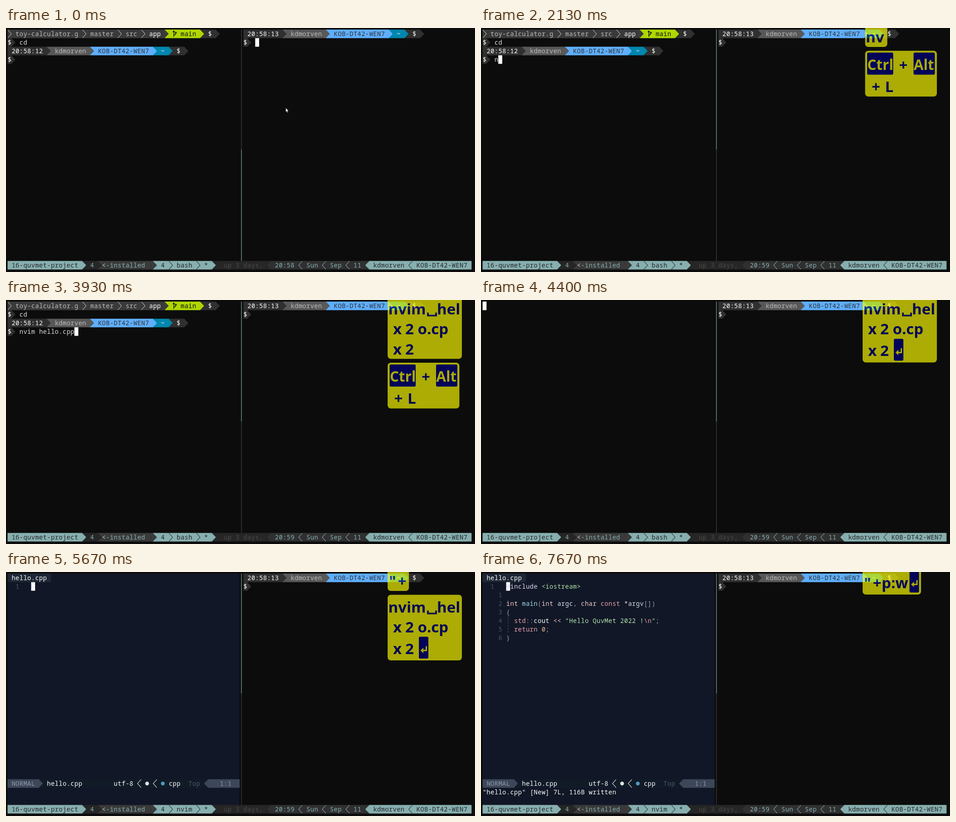
An HTML page that plays this animation: 1036x541 px, repeating every 8000 ms.

```html
<!DOCTYPE html>
<html lang="en">
<head>
<meta charset="utf-8">
<title>Terminal session</title>
<style>
html, body { margin: 0; width: 100%; height: 100%; overflow: hidden; background: #0c0c0c; }
svg { display: block; width: 1036px; height: 541px; }
.term { font: 13.8px "Noto Sans Mono", "DejaVu Sans Mono", monospace; letter-spacing: .4px; font-variant-ligatures: none; }
.keys { font: bold 33px "Open Sans", "Noto Sans", sans-serif; opacity: .66; }
.cap { font-size: 31.5px; }
</style>
</head>
<body>
<svg id="stage" viewBox="0 0 1036 541"></svg>
<script>
const LOOP = 8000, W = 8.682, H = 19;
const USER = 'kdmorven', HOST = 'KOB-DT42-WEN7', PROJECT = '16-quvmet-project';
const TEAL = '#87afaf', DARK = '#303030', GREY = '#585858', SKY = '#5fafff', BLUE = '#0087af',
  LIME = '#afd700', INK = '#262626', WHITE = '#fff', SOFT = '#bcbcbc', SHADE = '#3a3a3a',
  EDIT = '#111726', TAB = '#1e2735', MODE = '#3c4759', DIM = '#4b5565';
const YELLOW = '#ff0', NAVY = '#000080';
const LAP = .4; // overlap that hides seams between neighbouring cells

const X = c => 3.5 + c * W;
const Y = r => 3.5 + r * H;
const esc = s => s.replace(/&/g, '&amp;').replace(/</g, '&lt;');
const upTo = (times, t) => times.filter(at => at <= t).length;

const rect = (x, y, w, h, fill, rx = 0) =>
  `<rect x="${x}" y="${y}" width="${w}" height="${h}" fill="${fill}" rx="${rx}"/>`;
const line = (d, color, w) => `<path d="${d}" fill="none" stroke="${color}" stroke-width="${w}"/>`;
const cells = (c, r, n, fill) => rect(X(c), Y(r), n * W, H, fill);
const cursor = (c, r) => cells(c, r, 1, WHITE);

// Symbols drawn inside one cell
const glyphs = {
  '›': (x, y, f) => line(`M${x + .5} ${y + .5}l8 9l-8 9`, f, 1.1),
  '‹': (x, y, f) => line(`M${x + 8.5} ${y + .5}l-8 9l8 9`, f, 1.1),
  'ψ': (x, y, f) => line(`M${x + 2.5} ${y + 3}v13M${x + 2.5} ${y + 12.5}q4.5 -1 4.5 -5M${x + .5} ${y + 5.5}l2 -2.5l2 2.5M${x + 5} ${y + 8}l2 -2.5l2 2.5`, f, 1.4),
  '●': (x, y, f) => `<circle cx="${x + 4.3}" cy="${y + 9.5}" r="4.2" fill="${f}"/>`
};

function text(c, r, str, fill) {
  let out = '';
  for (const m of str.matchAll(/[›‹ψ●]|[^\s›‹ψ●]+/g)) {
    const x = X(c + m.index), draw = glyphs[m[0]];
    out += draw ? draw(x, Y(r), fill)
      : `<text x="${x + .2}" y="${Y(r) + 14.3}" fill="${fill}">${esc(m[0])}</text>`;
  }
  return out;
}
const seg = (c, r, str, bg, fg) =>
  rect(X(c), Y(r), str.length * W + LAP, H, bg) + text(c, r, str, fg);

function tip(c, r, fill, under, left) {
  const x = left ? X(c + 1) + LAP : X(c) - LAP, dx = left ? -W - LAP : W + LAP;
  return (under ? rect(X(c), Y(r), W + LAP, H, under) : '') +
    `<path d="M${x} ${Y(r)}l${dx} ${H / 2}l${-dx} ${H / 2}z" fill="${fill}"/>`;
}

const dollar = (c, r) => seg(c, r, '$', DARK, WHITE) + tip(c + 1, r, DARK);

function prompt(c, r, time) {
  return seg(c, r, ` ${time} `, DARK, WHITE) + tip(c + 10, r, DARK, GREY) +
    seg(c + 11, r, ` ${USER} `, GREY, SOFT) + tip(c + 21, r, GREY, SKY) +
    seg(c + 22, r, ` ${HOST} `, SKY, DARK) + tip(c + 37, r, SKY, BLUE) +
    seg(c + 38, r, ' ~ ', BLUE, WHITE) + tip(c + 41, r, BLUE, DARK) +
    seg(c + 42, r, ' $ ', DARK, WHITE) + tip(c + 45, r, DARK) + dollar(c, r + 1);
}

const COMMAND = 'nvim hello.cpp';
const typedAt = [1930, 2200, 2270, 2330, 2470, 2730, 2800, 2930, 3070, 3270, 3530, 3730, 3800, 3930];

function shell(t) {
  if (t >= 4330) return cursor(0, 0);
  const n = upTo(typedAt, t);
  let out = seg(0, 0, '› toy-calculator.g › master › src › ', SHADE, SOFT) +
    seg(36, 0, 'app ', SHADE, WHITE) + tip(40, 0, SHADE, LIME) +
    seg(41, 0, ' ψ main ', LIME, '#0c0c0c') + tip(49, 0, LIME, DARK) +
    seg(50, 0, ' $ ', DARK, WHITE) + tip(53, 0, DARK) +
    dollar(0, 1) + text(3, 1, 'cd', '#ddd') + prompt(0, 2, '20:58:12') +
    text(3, 3, COMMAND.slice(0, n), '#ddd');
  if (t >= 4270) out += cursor(0, 4);
  else if (t >= 1400) out += cursor(3 + n, 3);
  return out;
}

const ROSE = '#f2cdcd', RED = '#e8a2af', GREEN = '#b1e3ad', CYAN = '#a4dcea', PALE = '#d9e0ee', MUTE = '#989baa';
const code = [
  [1, 6, [['#include ', '#ddd6f3'], ['<iostream>', GREEN]]],
  [3, 6, [['int ', ROSE], ['main', CYAN], ['(', MUTE], ['int ', ROSE], ['argc', PALE], [', ', MUTE],
    ['char ', ROSE], ['const ', RED], ['*', ROSE], ['argv', PALE], ['[])', MUTE]]],
  [4, 6, [['{', MUTE]]],
  [5, 8, [['std', RED], ['::', MUTE], ['cout ', WHITE], ['<< ', ROSE], ['"Hello QuvMet 2022 !', GREEN],
    ['\\n', RED], ['"', GREEN], [';', MUTE]]],
  [6, 8, [['return ', RED], ['0', '#f8bd96'], [';', MUTE]]],
  [7, 6, [['}', MUTE]]]
];

function buffer() {
  let out = '';
  for (const [row, start, parts] of code) {
    let c = start;
    for (const [str, fill] of parts) {
      out += text(c, row, str, fill);
      c += str.length;
    }
  }
  for (let r = 2; r < 8; r++) out += text(4, r, String(r - 1), DIM);
  return out + `<path d="M${X(6.5)} ${Y(5)}v38" stroke="${DIM}" stroke-dasharray="4 2.3"/>`;
}

function editor(t) {
  const pasted = t >= 6270, dirty = pasted && t < 7670;
  let out = rect(3.5, 3.5, 59 * W, 27 * H, EDIT) +
    seg(0, 0, dirty ? ' + hello.cpp ' : ' hello.cpp ', TAB, WHITE) + text(2, 1, '1', DIM);
  if (t < 6070 || (pasted && t < 7070) || t >= 7600) out += cursor(6, 1);
  if (pasted) out += buffer();
  out += cells(0, 24, 59, '#111b28') + seg(0, 24, ' NORMAL ', MODE, '#8f9bab') + tip(8, 24, MODE) +
    text(10, 24, dirty ? 'hello.cpp [+]' : 'hello.cpp', WHITE) +
    text(27, 24, 'utf-8 ‹   ‹', WHITE) + text(35, 24, '●', '#e0e0e0') + text(39, 24, '●', '#519aba') +
    text(41, 24, 'cpp', WHITE) + text(46, 24, 'Top', DIM) +
    tip(50, 24, MODE, '', true) + seg(51, 24, '   1:1  ', MODE, '#8f9bab');
  if (t < 5470) {
    out += text(20, 25, 'Telescope-Frecency: removed 1 missing e', WHITE) + text(0, 26, 'ntries.', WHITE);
  } else if (t >= 7600) {
    out += text(0, 25, '"hello.cpp" [New] 7L, 116B written', WHITE);
  } else if (t >= 7070) {
    const cmd = t < 7400 ? ':' : ':w';
    out += text(0, 25, cmd, WHITE) + cursor(cmd.length, 25);
  }
  return out;
}

function statusBar(t) {
  const r = 27, app = t < 4600 ? 'bash' : 'nvim', clock = t < 1400 ? '20:58' : '20:59';
  return seg(0, r, ` ${PROJECT} `, TEAL, INK) + tip(19, r, TEAL, INK) +
    seg(20, r, ' 4 ', INK, TEAL) + tip(23, r, INK, SHADE) +
    seg(24, r, '<', SHADE, '#d0d0d0') + seg(25, r, '-installed  ', SHADE, TEAL) + tip(37, r, SHADE, TEAL) +
    seg(38, r, ` 4 › ${app} › * `, TEAL, INK) + tip(52, r, TEAL, INK) +
    seg(53, r, '  up 3 days, ', INK, '#4a4a4a') + tip(66, r, DARK, INK, true) +
    seg(67, r, ` ${clock} ‹ Sun ‹ Sep ‹ 11 `, DARK, TEAL) + tip(91, r, TEAL, DARK, true) +
    seg(92, r, ` ${USER} ‹ ${HOST} `, TEAL, INK);
}

function divider(t) {
  const x = X(59.5), top = t >= 1400;
  return line(`M${x} 3.5V269.5`, top ? TEAL : '#444', 1.2) +
    line(`M${x} 269.5V516.5`, top ? '#444' : TEAL, 1.2);
}

// Key display
const word = (x, y, str, fill = NAVY, cls = '') =>
  `<text x="${x}" y="${y}" fill="${fill}" class="${cls}">${esc(str)}</text>`;
const panel = (x, y, w, h) => rect(x, y, w, h, YELLOW, 7);
const keycap = (x, y, w, label) => rect(x, y, w, 49, NAVY, 3) + word(x + .2, y + 38, label, YELLOW, 'cap');
const enter = (x, y) => rect(x, y, 21, 48.5, NAVY, 3) +
  line(`M${x + 16.5} ${y + 21}v9.5h-9`, YELLOW, 3) +
  `<path d="M${x + 3.5} ${y + 30.5}l6.5 -6v12z" fill="${YELLOW}"/>`;

const combo = (x, y) => panel(x, y, 158.5, 101.5) + keycap(x + 4.5, y + 4, 57.5, 'Ctrl') +
  word(x + 75, y + 43, '+') + keycap(x + 107, y + 4, 47, 'Alt') +
  word(x + 14.5, y + 91, '+') + word(x + 44, y + 91, 'L');

const openAt = [1870, 2130, 2200, 2270, 2400, 2670, 2800, 2930, 3070, 3270, 3530, 3670, 3800, 3930, 4200];
const openW = [30, 49, 59, 91, 115, 135, 154, 164];
const openH = n => n < 9 ? 49 : n < 14 ? 93.5 : n < 15 ? 137.5 : 145.5;

function openKeys(x, y, n) {
  const twice = base => word(x + 12, base, 'x') + word(x + 39, base, '2');
  let out = panel(x, y, openW[Math.min(n, 8) - 1], openH(n)) + word(x + 1.5, y + 39, 'nvim'.slice(0, n));
  if (n > 4) out += line(`M${x + 89} ${y + 35}v6.5h18v-6.5`, NAVY, 3.6);
  if (n > 5) out += word(x + 109, y + 39, 'hel'.slice(0, n - 5));
  if (n > 8) out += twice(y + 83) + word(x + 66.5, y + 83, 'o.cp'.slice(0, n - 9));
  if (n > 13) out += twice(y + (n > 14 ? 131 : 127.5));
  if (n > 14) out += enter(x + 69, y + 93);
  return out;
}

const saveAt = [5330, 5670, 6070, 7070, 7330, 7530];
const saveW = [24, 47, 68, 77, 104, 129];

function saveKeys(x, y, n) {
  const base = y + (n > 5 ? 42.5 : 39);
  return panel(x, y, saveW[n - 1], n > 5 ? 57 : 49) + word(x + 3, base, '"') +
    (n > 1 ? word(x + 22.5, base, '+') : '') + word(x + 42, base, 'p:w'.slice(0, Math.max(0, n - 2))) +
    (n > 5 ? enter(x + 103.5, y + 4) : '');
}

function keys(t) {
  if (t < 1330) return '';
  const opened = upTo(openAt, t), saved = upTo(saveAt, t);
  const x = opened < 8 ? 848.5 : 843;
  let y = -7, out = '';
  if (saved) {
    out += saveKeys(x, y, saved);
    y += 57.5;
  }
  if (opened && t < 7270) {
    out += openKeys(x, y, opened);
    y += openH(opened) + 8.5;
  }
  if (t < 4400) out += combo(x, y);
  return `<g class="keys">${out}</g>`;
}

const pointer = '<path d="M618 177v9.5l2.2-2l1.5 3.4l1.5-.7l-1.5-3.2h2.6z" fill="#fff" stroke="#000" stroke-width=".5"/>';

function scene(t) {
  return '<g class="term">' + (t < 4600 ? shell(t) : editor(t)) + prompt(60, 0, '20:58:13') +
    (t < 1400 ? cursor(63, 1) : '') + divider(t) + statusBar(t) + '</g>' +
    (t < 1870 ? pointer : '') + keys(t);
}

const stage = document.getElementById('stage');
const start = performance.now();
let shown = '';
function tick() {
  const next = scene((performance.now() - start) % LOOP);
  if (next !== shown) stage.innerHTML = shown = next;
  requestAnimationFrame(tick);
}
tick();
</script>
</body>
</html>
```
